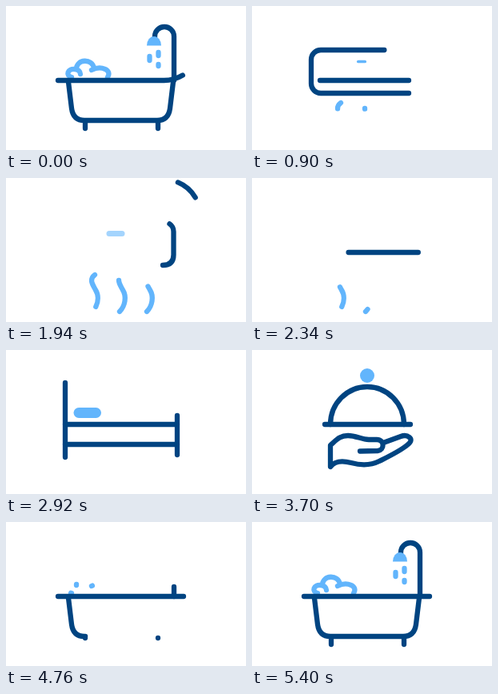
An HTML page that plays this animation: 300x180 px, repeating every 5760 ms.

```html
<!DOCTYPE html>
<html lang="en">
<head>
<meta charset="utf-8">
<title>Room amenities</title>
<style>
  html, body { margin: 0; width: 100%; height: 100%; overflow: hidden; background: #fff; }
  svg { display: block; width: 100vw; height: 100vh; }
  path { fill: none; stroke-linecap: round; stroke-linejoin: round; }
</style>
</head>
<body>
<svg id="stage" viewBox="0 0 300 180"></svg>
<script>
const LOOP = 5760, SHOW = 480, HIDE = 360;
const DARK = '#004481', LIGHT = '#62b5fc', WEIGHT = 6.3;
const stage = document.getElementById('stage');
const parts = [];

const wrap = t => (t + LOOP) % LOOP;
const ease = p => p < .5 ? 2 * p * p : 1 - 2 * (1 - p) ** 2;
const go = (t, start, dur) => ease(Math.min(1, Math.max(0, (t - start) / dur)));

// A value that moves on from `from`; each move is [start, duration, new value].
const track = (t, from, ...moves) =>
  moves.reduce((v, [start, dur, to]) => v + (to - v) * go(t, start, dur), from);

// How far a part has come in and gone out; its stay may cross the loop's end.
function life(t, show, hide, dur) {
  const age = wrap(t - show);
  return [go(age, wrap(hide - show), HIDE), go(age, 0, dur)];
}

function add(tag, attrs) {
  const el = document.createElementNS('http://www.w3.org/2000/svg', tag);
  for (const k in attrs) el.setAttribute(k, attrs[k]);
  return stage.appendChild(el);
}

const line = (d, color) => add('path', { d, stroke: color, 'stroke-width': WEIGHT });

// Leaves only the stretch of a path between two lengths.
function trim(el, a, b) {
  el.style.display = b - a < .05 ? 'none' : '';
  el.setAttribute('stroke-dasharray', `${Math.max(0, b - a)} 2000`);
  el.setAttribute('stroke-dashoffset', -a);
}

// A stroke drawn from its start, later wiped from its start.
function stroke(d, color, show, hide, { dur = SHOW, from = 0, to = 1 } = {}) {
  const el = line(d, color), total = el.getTotalLength();
  parts.push(t => {
    const [a, b] = life(t, show, hide, dur).map(p => (from + (to - from) * p) * total);
    trim(el, a, b);
  });
}

// A light shape that grows about a point, later fades.
function pop(tag, attrs, x, y, show, hide) {
  const el = add(tag, { style: `fill:${LIGHT}`, ...attrs });
  parts.push(t => {
    const [out, size] = life(t, show, hide, SHOW);
    el.setAttribute('transform', `translate(${x} ${y}) scale(${size}) translate(${-x} ${-y})`);
    el.setAttribute('opacity', 1 - out);
  });
}

// Bathtub
for (const d of ['M82 89C74 87 77 78 86 79C90 79 93 82 93 85',
                 'M88 79C88 66 108 65 110 78',
                 'M107 80C119 74 133 80 127 89'])
  stroke(d, LIGHT, 4700, 60);
stroke('M78 95L82 128Q84 143 98 143H189Q203 143 205 128L209 95', DARK, 4580, 180);
for (const x of [99, 190]) stroke(`M${x} 145V153`, DARK, 4720, 40);
stroke('M210 93V38A12 12 0 0 0 186 38V40', DARK, 4640, 120);
pop('path', { d: 'M176 49.5A9 11.5 0 0 1 194 49.5Z' }, 185, 41, 4740, 60);
['M179.5 63V68', 'M190.5 58V62', 'M190.5 73V75'].forEach((d, i) =>
  stroke(d, LIGHT, 5200 + 40 * i, 20 + 30 * i, { dur: 120 }));

// Air conditioner
stroke('M196 109H86A12 12 0 0 1 74 97V67A12 12 0 0 1 86 55H197.5A12 12 0 0 1 209.5 67V96Q209.5 109 196 109',
  DARK, 340, 1687, { dur: 900 });
pop('rect', { x: 125.5, y: 66, width: 23, height: 7, rx: 3.5 }, 137, 69.5, 655, 1775);
for (let i = 0; i < 3; i++) {
  const x = 111 + 34 * i;
  stroke(`M${x} 121c-8 6 -2 13 1 19c5 8 3 20 -4 27`, LIGHT, 790 + 75 * i, 2180 - 120 * i,
    { dur: 350, from: .16 * i, to: Math.min(1, .85 + .16 * i) });
}

// The level line is tub rim and shelf, loops the loop, then is bed rail, plate and rim again
const TURN = 197.5, R = 45.5, EXIT = TURN + 2 * Math.PI * R;
const dash = line(`M0 93H${TURN}a${R} ${R} 0 0 0 0 ${-2 * R}a${R} ${R} 0 0 0 0 ${2 * R}`, DARK);
const rail = line('M0 93H300', DARK);
parts.push(t => {
  trim(dash, track(t, 65, [580, 300, 85], [1670, 530, EXIT]),
             track(t, 222, [580, 300, 196], [1700, 514, EXIT]));
  trim(rail, track(t, TURN, [2160, 320, 74], [2960, SHOW, 91], [4300, 400, 65]),
             track(t, TURN, [2160, 320, 214], [2960, SHOW, 198], [4300, 400, 222]));
});

// Bed
stroke('M74 134V41', DARK, 2360, 2940);
stroke('M74 118H214', DARK, 2400, 2960);
stroke('M214 131V82', DARK, 2420, 3180);
pop('rect', { x: 84.5, y: 72, width: 34.5, height: 13, rx: 6.5 }, 102, 78.5, 2420, 2940);

// Served dish
stroke('M98 93A46 47 0 0 1 190 93', DARK, 3180, 4105);
stroke('M164 116L186 108C194 105 204 111 195 118C186 126 169 134 159 139C147 145 135 144 124 141' +
  'C113 138 104 138 98 146V119C106 112 110 107 120 107C130 107 137 112 146 112H156C166 112 166 125 157 126L135 126.5',
  DARK, 3200, 4057);
pop('circle', { cx: 144, cy: 32, r: 9 }, 144, 32, 3210, 3900);

const began = performance.now();
function tick() {
  const t = (performance.now() - began) % LOOP;
  parts.forEach(draw => draw(t));
  requestAnimationFrame(tick);
}
tick();
</script>
</body>
</html>
```
